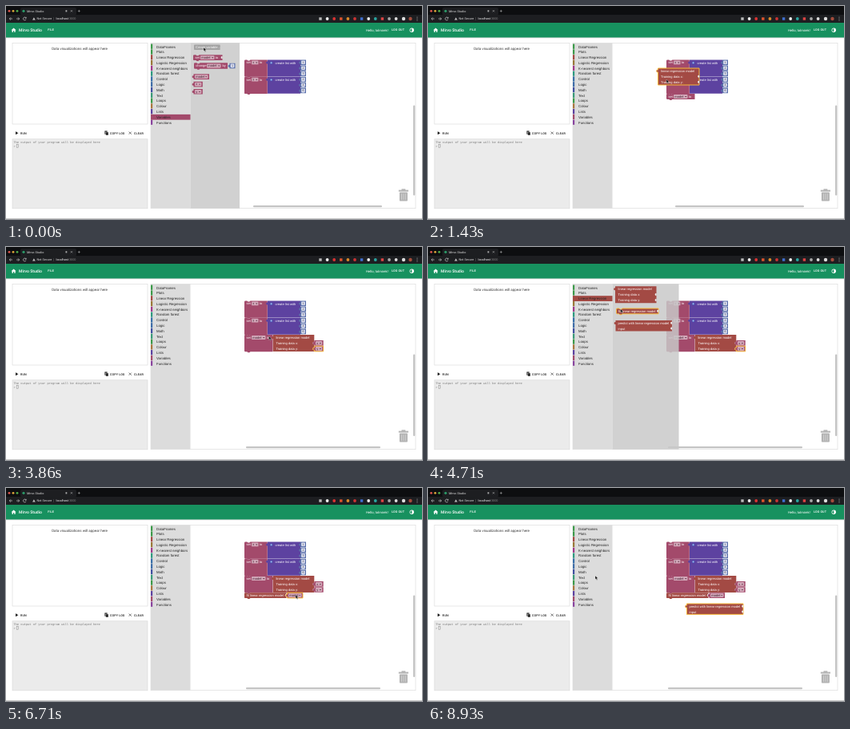
Animation of 520 by 267 pixels, one loop 9 s. Source, as an HTML page:

```html
<!DOCTYPE html>
<html lang="en">
<head>
<meta charset="utf-8">
<title>Block editor</title>
<style>
html, body { margin: 0; width: 100%; height: 100%; overflow: hidden; background: #fff; }
svg { display: block; width: 100%; height: 100%; }
text { font: 4.05px "Liberation Sans", Arial, sans-serif; fill: #fff; text-rendering: geometricPrecision; }
.ui { font: 4.47px Roboto, sans-serif; fill: #333; }
.button { font: 500 3.75px Roboto, sans-serif; letter-spacing: .1px; fill: #222; }
.title { font: 500 5.1px Roboto, sans-serif; }
.chrome { font: 3.8px Roboto, sans-serif; fill: #ddd; }
.white { fill: #fff; }
.mono { font: 3.7px "Liberation Mono", monospace; fill: #777; }
.category { font-size: 4.35px; fill: #222; }
.field { fill: #402030; }
.number { font-size: 3.6px; fill: #223; }
.selected > path:first-child { stroke: #f5b83d; stroke-width: 1; }
</style>
</head>
<body>
<svg id="stage" viewBox="0 0 520 267"></svg>
<script>
const LOOP = 9000;
const RED = '#a34a44', PINK = '#a34a6b', PURPLE = '#5d42a0', BLUE = '#5a6fa9';

const text = (x, y, s, cls = '', extra = '') => `<text x="${x}" y="${y}" class="${cls}" ${extra}>${s}</text>`;
const rect = (x, y, w, h, fill, extra = '') =>
  `<rect x="${x}" y="${y}" width="${w}" height="${h}" fill="${fill}" ${extra}/>`;
const dot = (x, y, r, fill) => `<circle cx="${x}" cy="${y}" r="${r}" fill="${fill}"/>`;
const line = (d, color, width = .7) => `<path d="${d}" fill="none" stroke="${color}" stroke-width="${width}"/>`;
const shape = (d, fill) => `<path d="${d}" fill="${fill}"/>`;
const group = (id, x, y, body) => `<g id="${id}" transform="translate(${x} ${y})">${body}</g>`;

// Block outlines: stacked statements have a notch, values have a tab on the left
const statement = (w, h, fill) =>
  shape(`M0 1.2q0-1.2 1.2-1.2h2.2l1 1h2l1-1H${w}V${h}H7.4l-1 1h-2l-1-1H1.2Q0 ${h} 0 ${h - 1.2}z`, fill);
const value = (w, h, fill) => shape(`M0 0H${w}V${h}H0V4.8c-2.4 1.2-2.4-3.8 0-2.6z`, fill);
const socket = (x, y) => shape(`M${x} ${y + 2}c-2.4-1.2-2.4 3.8 0 2.6z`, '#eee');

const dropdown = (x, y, w, name) => rect(x, y, w, 4.8, '#d3a9ba', 'rx=".9"')
  + text(x + 1.3, y + 3.7, name, 'field')
  + shape(`M${x + w - 3.4} ${y + 2}h2.2l-1.1 1.4z`, '#5a2c40');
const number = (x, y, n) => `<g transform="translate(${x} ${y})">${value(7, 6.5, BLUE)}`
  + rect(1.2, .9, 4.6, 4.7, '#dfe3f3', 'rx=".8"') + text(2.5, 4.6, n, 'number') + '</g>';

const setter = (w, h, name, fieldWidth) => statement(w, h, PINK) + text(2.5, 4.9, 'set')
  + dropdown(9, 1, fieldWidth, name) + text(fieldWidth + 10.3, 4.9, 'to');
const getter = (name, w) => value(w, 6.6, PINK) + dropdown(1.5, .9, w - 3, name);
const list = values => value(41, 21, PURPLE) + dot(4.6, 3.7, 1.7, '#4a62c0')
  + line('M3.6 3.7h2M4.6 2.7v2', '#fff', .4) + text(9.5, 5, 'create list with')
  + values.map((n, i) => number(41, i * 7, n)).join('');
const regression = () => value(51.5, 21, RED) + text(3.6, 5, 'linear regression model')
  + text(3.6, 12, 'Training data x:') + text(3.6, 19, 'Training data y:') + socket(51.5, 7) + socket(51.5, 14);
const fit = () => statement(52.5, 6.8, RED) + text(2.6, 4.9, 'fit linear regression model') + socket(52.5, 0);
const predict = () => value(70.5, 13.4, RED) + text(3, 5, 'predict with linear regression model')
  + text(3, 11.6, 'input') + socket(70.5, 0) + socket(70.5, 6.8);

const categories = [
  ['DataFrames', '#3d9a4a'], ['Plots', '#3d9a4a'], ['Linear Regression', RED],
  ['Logistic Regression', '#9a7a3a'], ['K-nearest neighbors', '#a03a8a'], ['Random forest', '#2f9a80'],
  ['Control', '#3a6fa8'], ['Logic', '#3f6ea8'], ['Math', '#4050a0'], ['Text', '#3a9a78'],
  ['Loops', '#3d9a4a'], ['Colour', '#a9763f'], ['Lists', PURPLE], ['Variables', PINK], ['Functions', '#8a459f']
];
const rowY = i => 47.6 + i * 6.79;
const activeRow = i => rect(181, rowY(i), 49.5, 6.8, categories[i][1]) + text(188, rowY(i) + 4.9, categories[i][0], 'category white');

function browserBar() {
  const icons = ['#bbb', '#eee', '#d33', '#e0542c', '#d98a2b', '#c33', '#3f6fd0', '#eee', '#2aa5a0', '#d44', '#aaa', '#ddd'];
  return rect(0, 0, 520, 11.5, '#0d0e10') + rect(0, 11, 520, 10, '#1d1e21')
    + rect(18, 2, 70, 9.5, '#1d1e21', 'rx="2"')
    + ['#e0574f', '#dfa83a', '#4fae4a'].map((c, i) => dot(4 + i * 5, 6.3, 1.4, c)).join('')
    + dot(22, 6.3, 1.6, '#2b9a68') + text(26, 7.7, 'Mirvo Studio', 'chrome')
    + rect(74.5, 5.2, 1.8, 2.2, '#aaa') + line('M80.8 5.2l2.2 2.2m0-2.2l-2.2 2.2M89.8 6.3h3m-1.5-1.5v3', '#ccc', .5)
    + line('M8 16H4.3l1.7-1.7M4.3 16L6 17.7M13 16h3.7L15 14.3M16.7 16L15 17.7', '#ddd', .6)
    + line('M25 15a1.9 1.9 0 1 0 .1 1.8M25.2 13.8v1.5h-1.5', '#ddd', .6)
    + shape('M33 17.6l1.9-3.4 1.9 3.4z', '#bbb') + text(38.5, 17.4, 'Not Secure', 'chrome')
    + line('M59.5 14v4', '#666', .4)
    + text(62.5, 17.4, 'localhost<tspan fill="#888">:3000</tspan>', 'chrome white')
    + icons.map((c, i) => i % 3 ? dot(393 + i * 8.6, 16, 1.9, c) : rect(391.3 + i * 8.6, 14.3, 3.4, 3.4, c)).join('')
    + dot(497, 16, 2.2, '#ddd') + dot(505.5, 16, 2.2, '#a44c3c')
    + [14, 16, 18].map(y => dot(514, y, .5, '#ccc')).join('');
}

function header() {
  return rect(0, 21, 520, 18.5, '#17915f') + rect(0, 39.5, 520, .8, '#000', 'opacity=".15"')
    + shape('M6.6 30.2l3-2.7 3 2.7h-.9v2.5h-1.5v-1.8H9v1.8H7.5v-2.5z', '#fff')
    + text(16, 31.8, 'Mirvo Studio', 'title') + text(52.3, 31.4, 'FILE', 'button white')
    + text(450, 31.5, 'Hello, tolmirek!', 'ui white', 'style="font-size:4.2px"') + text(482, 31.4, 'LOG OUT', 'button white')
    + dot(507.3, 30.2, 2.7, '#fff') + shape('M507.3 28.2a2 2 0 0 0 0 4z', '#17915f');
}

function panels() {
  const border = 'stroke="#d8d8d8" stroke-width=".6"';
  return rect(8, 46.3, 169, 101.7, '#fff', border)
    + text(92, 55.4, 'Data visualizations will appear here', 'ui', 'text-anchor="middle"')
    + shape('M12 157.2l3.4 2-3.4 2z', '#222') + text(18, 160.6, 'RUN', 'button')
    + rect(123.4, 156.5, 3.2, 4.2, '#222') + rect(124.6, 158, 3.4, 4, '#222', 'stroke="#fff" stroke-width=".4"')
    + text(130, 160.6, 'COPY LOG', 'button')
    + line('M153.6 157.6l3.2 3.2m0-3.2l-3.2 3.2', '#222', .6) + text(160, 160.6, 'CLEAR', 'button')
    + rect(8, 166.8, 169, 87, '#ebebeb', border)
    + text(9.4, 171.8, 'The output of your program will be displayed here', 'mono')
    + text(9.4, 177.2, '&gt;', 'mono') + rect(13.6, 173.6, 2, 4, 'none', 'stroke="#777" stroke-width=".4"')
    + rect(181, 46.3, 331, 207.4, '#fff', border);
}

function toolbox() {
  return rect(181, 46.3, 49.5, 207.4, '#dcdcdc') + categories.map(([name, color], i) =>
    rect(181, rowY(i), 2.2, 6.2, color) + text(188, rowY(i) + 4.9, name, 'category')).join('');
}

function workspace() {
  return rect(490.8, 230.6, 12.2, 2, '#b3b3b3') + rect(494.5, 229.3, 4.8, 1.6, '#b3b3b3')
    + rect(491.9, 233.6, 10, 11, '#b3b3b3', 'rx=".8"')
    + line('M494.5 235.3v7.5M496.9 235.3v7.5M499.3 235.3v7.5', '#dcdcdc', .7)
    + rect(309, 250, 161, 2.3, '#c4c4c4', 'id="scrollX" rx="1.1"') + rect(509, 124.5, 2.3, 113, '#c4c4c4', 'id="scrollY" rx="1.1"')
    + group('setX', 298, 67.5, setter(28.8, 21.3, 'x', 8.5))
    + group('listX', 327, 67.5, list([1, 2, 3]))
    + group('setY', 298, 88.8, setter(28.8, 21.3, 'y', 8.5))
    + group('listY', 327, 88.8, list([2, 4, 6]))
    + group('setModel', 0, 0, setter(35.5, 6.8, 'model', 17.5))
    + group('regression', 0, 0, regression())
    + group('getX', 0, 0, getter('x', 11.3)) + group('getY', 0, 0, getter('y', 11.3))
    + group('fit', 0, 0, fit()) + group('getModel', 0, 0, getter('model', 19.5))
    + group('predict', 0, 0, predict());
}

function flyouts() {
  const back = w => rect(230.5, 46.3, w, 207.4, '#c9c9c9', 'opacity=".84"');
  const change = statement(42, 7.5, PINK) + text(2.3, 5.2, 'change') + dropdown(16, 1.3, 17.5, 'model')
    + text(35.5, 5.2, 'by') + number(44.5, .4, 1);
  return group('variables', 0, 0, back(61.5) + activeRow(13)
      + rect(235, 48.6, 32.7, 6.4, '#a3a3a3', 'rx=".8"') + text(237, 53.2, 'Create variable...')
      + group('flySet', 234, 61.3, setter(36.5, 6.8, 'model', 17.5) + socket(36.5, 0))
      + group('flyChange', 235, 71.3, change) + group('flyModel', 234.5, 85.3, getter('model', 19.5))
      + group('flyX', 234.5, 94.8, getter('x', 11.3)) + group('flyY', 234.5, 104, getter('y', 11.3)))
    + group('linear', 0, 0, back(83) + activeRow(2) + group('flyRegression', 234, 49.3, regression())
      + group('flyFit', 235.5, 77, fit()) + group('flyPredict', 234.5, 92, predict()));
}

document.getElementById('stage').innerHTML = rect(0, 0, 520, 267, '#fff') + browserBar() + header() + panels()
  + workspace() + toolbox() + flyouts() + rect(0, 266, 520, 1, '#c8c8c8')
  + group('pointer', 0, 0, '<path d="M0 0v4.6l1.1-1 .8 1.8.9-.4-.8-1.7h1.5z" fill="#111" stroke="#fff" stroke-width=".3"/>');
const $ = id => document.getElementById(id);

// Tracks hold [time, x, y] keys
const pointerTrack = [
  [0, 247, 52], [180, 241, 64], [700, 304, 113], [900, 205, 63], [1100, 246, 64], [1430, 298, 92],
  [1800, 345, 125], [2000, 200, 138], [2200, 240, 97], [2450, 392, 119], [2600, 200, 138], [2720, 240, 106],
  [2930, 397, 124], [3150, 391, 127], [3600, 405, 142], [4220, 205, 63], [4640, 240, 77], [4760, 241, 78],
  [5200, 303, 132], [5400, 302, 118], [5860, 195, 123], [6000, 200, 138], [6250, 245, 88], [6700, 362, 134],
  [7300, 375, 141], [8000, 207, 62], [8200, 242, 96], [8600, 331, 149], [8930, 209, 110], [9000, 209, 110]
];
const blockTracks = {
  setModel: [[180, 234, 61.3], [700, 298, 110.1]],
  regression: [[1100, 234, 49.3], [1430, 287.5, 78], [1800, 333.8, 110.1]],
  getX: [[2200, 234.5, 94.8], [2450, 385.4, 117.1]],
  getY: [[2720, 234.5, 104], [2930, 392.5, 132], [3150, 385.4, 124.2]],
  fit: [[4760, 235.5, 77], [5200, 298, 131.3]],
  getModel: [[6250, 234.5, 85.3], [6700, 351.5, 131.3]],
  predict: [[8200, 234.5, 92], [8600, 323.5, 145]]
};
const openTimes = {
  variables: [[0, 200], [2020, 2220], [2610, 2740], [6020, 6270]],
  linear: [[920, 1120], [4280, 4760], [8040, 8220]]
};
const selectTimes = {
  setModel: [[180, 1100], [5400, 6250]], regression: [[1100, 2200]], getX: [[2200, 2720]],
  getY: [[2720, 4760]], flyFit: [[4600, 4760]], fit: [[4760, 5400]], getModel: [[6250, 7300]], predict: [[8200, LOOP]]
};

const within = (ranges, t) => ranges.some(([from, to]) => t >= from && t < to);
function at(track, t) {
  const next = track.findIndex(key => key[0] > t);
  if (next < 1) return (next ? track[track.length - 1] : track[0]).slice(1);
  const a = track[next - 1], b = track[next], p = (t - a[0]) / (b[0] - a[0]), k = p * p * (3 - 2 * p);
  return [a[1] + (b[1] - a[1]) * k, a[2] + (b[2] - a[2]) * k];
}
const place = (id, track, t) => $(id).setAttribute('transform', `translate(${at(track, t)})`);
const show = (id, on) => { $(id).style.display = on ? '' : 'none'; };
const setAttrs = (id, attrs) => Object.entries(attrs).forEach(([k, v]) => $(id).setAttribute(k, v));

const outlineOf = h => statement(35.5, h, PINK).match(/d="([^"]+)"/)[1];
const shortOutline = outlineOf(6.8), tallOutline = outlineOf(21.2);

function draw(now) {
  const t = now % LOOP;
  place('pointer', pointerTrack, t);
  for (const [id, track] of Object.entries(blockTracks)) {
    show(id, t >= track[0][0]);
    place(id, track, t);
  }
  for (const id in openTimes) show(id, within(openTimes[id], t));
  for (const id in selectTimes) $(id).classList.toggle('selected', within(selectTimes[id], t));

  const joined = t >= 1800;
  $('setModel').firstChild.setAttribute('d', joined ? tallOutline : shortOutline);
  setAttrs('scrollX', !joined ? { x: 309, width: 161 } : t < 3150 ? { x: 296, width: 171 } : { x: 300, width: 168 });
  setAttrs('scrollY', joined ? { y: 134.5, height: 102.5 } : { y: 124.5, height: 113 });
  requestAnimationFrame(() => draw(performance.now() - start));
}
const start = performance.now();
draw(0);
</script>
</body>
</html>
```
